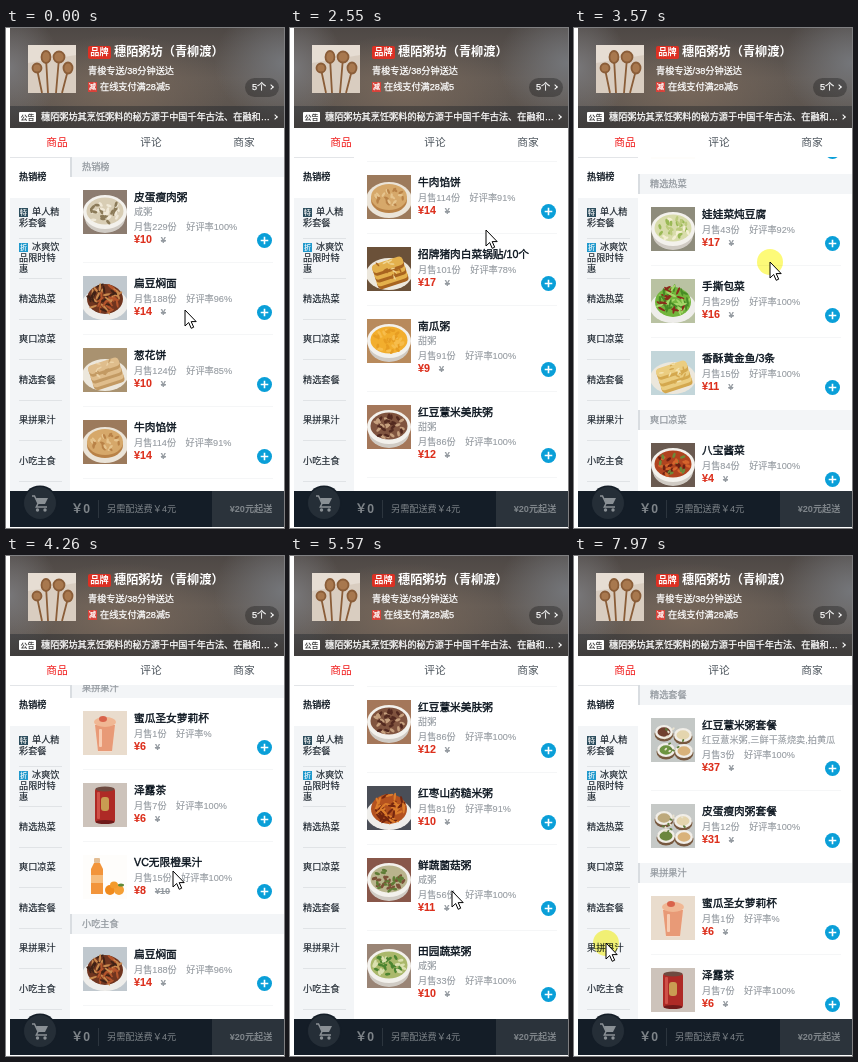
Write an HTML page that moves like this. It is 278 px wide and 500 px high and loops after 8000 ms.

```html
<!DOCTYPE html>
<html lang="zh-CN">
<head>
<meta charset="utf-8">
<title>外卖点餐</title>
<style>
html, body { margin: 0; width: 100%; height: 100%; overflow: hidden; background: #fff; }
#stage { position: relative; width: 278px; height: 500px; overflow: hidden;
  font: 9.17px/12px "Liberation Sans", "Noto Sans CJK SC", "Noto Sans CJK", sans-serif; white-space: nowrap; }
#stage * { box-sizing: border-box; }
.abs, .abs > * { position: absolute; }
b { font-weight: 700; }

.top { left: 4px; top: 0; width: 274px; height: 100px; color: #fff; overflow: hidden; -webkit-text-stroke: .25px;
  background: radial-gradient(ellipse 70px 60px at 100% 35%, #74767a, transparent), radial-gradient(ellipse 50px 60px at 0 40%, #777678, transparent),
    radial-gradient(ellipse 110px 55px at 40% 62%, #77675a, transparent), linear-gradient(#4e4845, #625a54 50%, #5a524c); }
.top .avatar { left: 18px; top: 17px; }
.brand { left: 78px; top: 18px; width: 23px; height: 13px; border-radius: 2px; background: #dc3023; text-align: center; line-height: 13px; -webkit-text-stroke: 0; }
.shop { left: 104px; top: 17px; font-size: 12.2px; line-height: 15px; -webkit-text-stroke: 0; }
.cut { left: 78px; top: 54px; width: 9px; height: 10px; background: #d8423a; font-size: 7px; line-height: 10px; text-align: center; }
.count { left: 235px; top: 50px; width: 34px; height: 19px; border-radius: 10px; background: rgba(0,0,0,.28); line-height: 19px; padding-left: 7px; }
.notice { left: 0; top: 78px; width: 274px; height: 22px; background: rgba(7,17,27,.32); }
.notice i { left: 9px; top: 6px; width: 17px; height: 10px; border-radius: 1px; background: #fff; color: #444; font: 700 7px/10px "Noto Sans CJK SC", sans-serif; text-align: center; -webkit-text-stroke: 0; }
.notice span { left: 31px; top: 5px; width: 230px; overflow: hidden; text-overflow: ellipsis; }
.top .chev { width: 4px; height: 4px; border: solid #fff; border-width: 1px 1px 0 0; border-radius: 0; background: none; transform: rotate(45deg); }

.tabs { left: 4px; top: 100px; width: 274px; height: 30px; border-bottom: 1px solid #e3e5e8; background: #fff; font-size: 10.7px; color: #4d555d; }
.tabs span { top: 7px; width: 60px; line-height: 15px; text-align: center; }

.menu { position: absolute; left: 4px; top: 129.5px; width: 60px; height: 334px; overflow: hidden; background: #f3f5f7; color: #1c252e; -webkit-text-stroke: .15px; }
.menu div { height: 40.5px; padding: 0 8px 0 9px; display: flex; align-items: center; position: relative; }
.menu div:first-child { background: #fff; font-weight: 700; }
.menu div + div:not(:last-child)::after { content: ""; position: absolute; left: 9px; right: 8px; bottom: 0; height: 1px; background: #e0e3e6; }
.menu p { margin: 0; width: 44px; line-height: 11px; white-space: normal; word-break: break-all; }
.menu i { display: inline-block; width: 9px; height: 9px; margin-right: 4px; color: #fff; font: 7px/9px "Noto Sans CJK SC", sans-serif; text-align: center; }

.view { position: absolute; left: 64px; top: 129px; width: 214px; height: 334px; overflow: hidden; background: #fff; }
.view h2 { margin: 0; height: 20px; padding-left: 10px; border-left: 2px solid #d9dde1; background: #f3f5f7; font: inherit; line-height: 20px; color: #93999f; -webkit-text-stroke: .25px; }
.item { position: relative; height: 72px; color: #93999f; -webkit-text-stroke: .1px; }
.item:not(.last)::after { content: ""; position: absolute; left: 13px; right: 11px; bottom: 0; height: 1px; background: #f5f6f7; }
.item > * { position: absolute; left: 64px; }
.item .pic { left: 13px; top: 13px; }
.item .name { top: 12px; font-size: 10.7px; line-height: 16px; color: #07111b; -webkit-text-stroke: .35px; }
.item .desc { top: 29px; width: 137px; white-space: normal; line-height: 13px; }
.item .info { bottom: 30px; }
.info span { margin-left: 9.5px; }
.item .price { bottom: 16px; font-size: 10.7px; line-height: 14px; font-weight: 700; color: #dc2f1c; }
.price s { margin-left: 9px; font-size: 9.17px; color: #93999f; }
.item .add { left: 186.5px; bottom: 15px; }

.bar { left: 4px; top: 463px; width: 274px; height: 36px; background: #141d27; color: #7e8489; }
.bar .pay { left: 202px; top: 0; width: 72px; height: 36px; padding-left: 6px; background: #2b333b; font-weight: 700; line-height: 37px; text-align: center; }
.bar .cart { left: 12px; top: -6px; }
#spot { left: -13px; top: -13px; width: 26px; height: 26px; border-radius: 50%; background: #fdfa78; mix-blend-mode: multiply; }
</style>
</head>
<body>
<div id="stage">
  <div class="top abs">
    <svg class="avatar" width="48" height="48">
      <rect width="48" height="48" fill="#d9cdc0"/><path d="M0 0H48V10L0 18Z" fill="#e6ddd3"/>
      <g fill="#a8784e" stroke="#8a5d38" stroke-width="1.8">
        <path d="M9 24L14 48M18 13L20 48M31 13L28 48M40 25L34 48"/>
        <circle cx="9" cy="23" r="4.5"/><ellipse cx="18" cy="12" rx="4.5" ry="6"/><circle cx="31" cy="12" r="5.5"/><ellipse cx="40" cy="23" rx="4.5" ry="5.5"/>
      </g>
    </svg>
    <b class="brand">品牌</b><b class="shop">穗陌粥坊（青柳渡）</b>
    <span style="left:78px;top:37px">青梭专送/38分钟送达</span>
    <span class="cut">减</span><span style="left:90px;top:53px">在线支付满28减5</span>
    <span class="count">5个</span><i class="chev" style="left:259px;top:57px"></i>
    <div class="notice abs"><i>公告</i><span>穗陌粥坊其烹饪粥料的秘方源于中国千年古法、在融和现代制作工艺</span><i class="chev" style="left:263px;top:9px"></i></div>
  </div>
  <div class="tabs abs"><span style="left:17px;color:#f01414">商品</span><span style="left:111px">评论</span><span style="left:204px">商家</span></div>
  <div class="menu" id="menu"></div>
  <div class="view"><div id="list"></div></div>
  <div class="bar abs">
    <svg class="cart" width="36" height="36">
      <circle cx="18" cy="18" r="17.5" fill="#141d27"/><circle cx="18" cy="18" r="16" fill="#252e37"/>
      <g fill="#8a9095"><path d="M14 13H26L23 19H16Z"/><circle cx="15.5" cy="25" r="1.7"/><circle cx="23" cy="25" r="1.7"/></g>
      <path d="M10 11H12.5L16 18.5L14.3 22H25" fill="none" stroke="#8a9095" stroke-width="1.5"/>
    </svg>
    <b style="left:61px;top:10px;font-size:12.2px;line-height:16px">￥0</b>
    <i style="left:88px;top:9px;width:1px;height:18px;background:#2c353e"></i>
    <span style="left:97px;top:12px">另需配送费￥4元</span>
    <span class="pay">¥20元起送</span>
  </div>
  <div class="abs" id="cursor" style="left:0;top:0">
    <div id="spot"></div>
    <svg width="14" height="21" style="left:-.5px;top:-.5px"><path d="M1 1V17L4.7 13.5L7.2 19.3L9.7 18.2L7.2 12.6H12.2Z" fill="#fff" stroke="#000"/></svg>
  </div>
</div>
<script>
// name: [description, sold, rating, price, old price, picture kind, backdrop, food, accents...]
const dishes = {
  皮蛋瘦肉粥: ['咸粥', 229, 100, 10, '', 'bowl', '#8c7c70', '#d8cdb4', '#8b7a58', '#f0e9d8'],
  扁豆焖面: ['', 188, 96, 14, '', 'plate', '#c0c8ce', '#70351f', '#b4552c', '#402216', '#c98a4e'],
  葱花饼: ['', 124, 85, 10, '', 'cake', '#a99270', '#dfbd8c', '#c39a63', '#ecd3a8'],
  牛肉馅饼: ['', 114, 91, 14, '', 'pie', '#9c7a5c', '#d6a86a', '#b98247', '#e6c48e'],
  '招牌猪肉白菜锅贴/10个': ['', 101, 78, 17, '', 'cake', '#6b5139', '#e3b04c', '#a8641f', '#f0d694'],
  南瓜粥: ['甜粥', 91, 100, 9, '', 'bowl', '#b88a5c', '#f2ae2e', '#f7bd4c', '#e79d22'],
  红豆薏米美肤粥: ['甜粥', 86, 100, 12, '', 'bowl', '#a4775a', '#80543f', '#532a20', '#c6a07e'],
  红枣山药糙米粥: ['', 81, 91, 10, '', 'plate', '#4a4e57', '#b4521f', '#dc7d2c', '#74260f'],
  糊塌子: ['', 80, 93, 10, '', 'pie', '#cbbf9f', '#d8b656', '#8da044', '#ecd58b'],
  鲜蔬菌菇粥: ['咸粥', 56, 100, 11, '', 'bowl', '#88574a', '#b9b48d', '#5f7d36', '#7c5138'],
  田园蔬菜粥: ['咸粥', 33, 100, 10, '', 'bowl', '#9a8576', '#aab86b', '#4c8531', '#dbe0b0'],
  红枣山药粥套餐: ['红枣山药糙米粥,素材包,爽口莴笋丝,四川泡菜或八宝酱菜', 17, 100, 29, '', 'set', '#c9cbc9', '#9b3c24', '#cfae72'],
  VC无限橙果汁: ['', 15, 100, 8, 10, 'bottle', '#fefdfb', '#f2943a'],
  娃娃菜炖豆腐: ['', 43, 92, 17, '', 'bowl', '#8e8c7c', '#d8dcaa', '#9ab956', '#f3efd2', '#bccb7c'],
  手撕包菜: ['', 29, 100, 16, '', 'plate', '#b9c2a2', '#72b53c', '#a5d768', '#468a25', '#8a2c1c'],
  '香酥黄金鱼/3条': ['', 15, 100, 11, '', 'cake', '#c3d6da', '#ebcd80', '#d4a84e', '#f4e3ae'],
  八宝酱菜: ['', 84, 100, 4, '', 'bowl', '#6a5a50', '#b0431f', '#d5652c', '#6b1f12', '#6c8a3a'],
  拍黄瓜: ['', 28, 100, 9, '', 'plate', '#37413a', '#4c7d3c', '#86b25a', '#254c25'],
  红豆薏米粥套餐: ['红豆薏米粥,三鲜干蒸烧卖,拍黄瓜', 3, 100, 37, '', 'set', '#c4c8c6', '#70402f', '#6d9440'],
  皮蛋瘦肉粥套餐: ['', 12, 100, 31, '', 'set', '#c6c9c7', '#bda97c', '#6c873e'],
  蜜瓜圣女萝莉杯: ['', 1, '', 6, '', 'glass', '#e9dccd', '#e58a62'],
  泽露茶: ['', 7, 100, 6, '', 'can', '#cdc3bb', '#ae2a26'],
};
const staples = '扁豆焖面 葱花饼 牛肉馅饼 招牌猪肉白菜锅贴/10个';
const sections = {
  热销榜: `皮蛋瘦肉粥 ${staples} 南瓜粥 红豆薏米美肤粥 八宝酱菜 红枣山药糙米粥 糊塌子`,
  单人精彩套餐: '红枣山药粥套餐',
  冰爽饮品限时特惠: 'VC无限橙果汁',
  精选热菜: '娃娃菜炖豆腐 手撕包菜 香酥黄金鱼/3条',
  爽口凉菜: '八宝酱菜 拍黄瓜',
  精选套餐: '红豆薏米粥套餐 皮蛋瘦肉粥套餐',
  果拼果汁: '蜜瓜圣女萝莉杯 泽露茶 VC无限橙果汁',
  小吃主食: `${staples} 糊塌子`,
  特色粥品: '皮蛋瘦肉粥 南瓜粥 红豆薏米美肤粥 红枣山药糙米粥 鲜蔬菌菇粥 田园蔬菜粥',
};
const badges = { 单人精彩套餐: ['特', '#2d4e5e'], 冰爽饮品限时特惠: ['折', '#2199cc'] };

const oval = (x, y, rx, ry, fill) => `<ellipse cx="${x}" cy="${y}" rx="${rx}" ry="${ry}" fill="${fill}"/>`;
const box = (x, y, w, h, fill, r = 0) => `<rect x="${x}" y="${y}" width="${w}" height="${h}" rx="${r}" fill="${fill}"/>`;

function random(seed) {
  return () => (seed = (seed * 16807) % 2147483647) / 2147483647;
}

function scatter(seed, colors, count, rx, ry, w, h) {
  const rnd = random(seed);
  let out = '';
  for (let i = 0; i < count; i++) {
    const a = rnd() * 6.283, d = Math.sqrt(rnd());
    const x = 22 + Math.cos(a) * d * rx, y = 22 + Math.sin(a) * d * ry;
    out += `<g transform="translate(${x.toFixed(1)} ${y.toFixed(1)}) rotate(${Math.round(rnd() * 180)})">${oval(0, 0, w, h, colors[i % colors.length])}</g>`;
  }
  return out;
}

const kinds = {
  bowl: (seed, food, accents) => oval(22, 28, 20, 15, '#d0cbc4') + oval(22, 22, 22, 17, '#f3f1ec')
    + oval(22, 21, 18.5, 13.5, food) + scatter(seed, accents, 34, 16, 11, 2.8, 1.4),
  plate: (seed, food, accents) => oval(22, 28, 23, 16, '#eeedea') + oval(22, 23, 18, 15, food)
    + scatter(seed, accents, 50, 16, 14, 4, 1.1),
  pie: (seed, food, accents) => oval(22, 25, 23, 18, '#ebe4d8') + oval(22, 25, 18, 13, accents[0])
    + oval(22, 22, 18, 13, food) + scatter(seed, accents, 24, 14, 9, 2.6, 1.2),
  cake: (seed, food, accents) => oval(22, 27, 23, 16, '#ece7dc')
    + [0, 1, 2].map(i => `<g transform="rotate(-18 22 22)">${box(6, 29 - i * 7, 32, 10, accents[0], 4) + box(6, 27 - i * 7, 32, 9, food, 4)}</g>`).join('')
    + scatter(seed, accents, 14, 13, 10, 2.6, .8),
  set: (seed, food, accents) => [[13, 14, food], [32, 17, '#e4d5ae'], [15, 32, accents[0]], [33, 33, '#d9b27a']]
    .map(([x, y, c]) => oval(x, y + 2, 9.5, 7.5, '#77583f') + oval(x, y, 9, 7, '#f1eee8') + oval(x, y, 6.5, 4.7, c)).join('')
    + scatter(seed, ['#5f7d3c', '#e9e2cf'], 12, 15, 13, 1.6, 1),
  glass: (seed, food) => `<path d="M11 9H33L29 41H15Z" fill="#f5dccb"/><path d="M12 14H32L29 40H15Z" fill="${food}" opacity=".8"/>`
    + oval(22, 11, 11, 5, '#f0b794') + oval(20, 8, 4, 3, '#d9634b') + box(16, 18, 3, 18, '#f7cdb3', 1),
  can: (seed, food) => box(12, 5, 20, 35, food, 3) + oval(22, 6, 9.5, 2.5, '#6e4a40') + box(14, 9, 3, 27, '#cf5148', 1)
    + box(18, 14, 8, 14, '#c99c52', 3) + oval(22, 39, 9.5, 2, '#6f1a1a'),
  bottle: (seed, food) => box(11, 3, 6, 5, '#e3bd94', 1) + `<path d="M11 8H17L20 14V39H8V14Z" fill="${food}"/>` + box(8, 20, 12, 8, '#f6bd7d')
    + oval(27, 35, 5, 5, '#f08a1c') + oval(36, 35, 5, 5, '#f59f34') + oval(31, 30, 4, 3.5, '#f39a2c') + oval(38, 30, 3, 1.5, '#5f8a3a'),
};

function picture(seed, kind, back, food, accents) {
  return `<svg class="pic" width="44" height="44">${box(0, 0, 44, 44, back)}${kinds[kind](seed, food, accents)}</svg>`;
}

const addButton = '<svg class="add" width="15" height="15"><circle cx="7.5" cy="7.5" r="7.5" fill="#0a9fd8"/><path d="M3.7 7.5H11.3M7.5 3.7V11.3" stroke="#fff" stroke-width="1.6"/></svg>';

function itemHtml(name, last) {
  const [desc, sold, rating, price, old, kind, back, food, ...accents] = dishes[name];
  const height = !desc ? 72 : desc.length > 20 ? 99 : 86;
  const seed = 77 + name.length * 131 + sold * 17;
  return `<div class="item${last ? ' last' : ''}" style="height:${height}px">${picture(seed, kind, back, food, accents)}
    <div class="name">${name}</div>${desc && `<div class="desc">${desc}</div>`}
    <div class="info">月售${sold}份<span>好评率${rating}%</span></div>
    <div class="price">¥${price}<s>¥${old}</s></div>${addButton}</div>`;
}

const $ = id => document.getElementById(id);
$('menu').innerHTML = Object.keys(sections).map(title => {
  const badge = badges[title];
  return `<div><p>${badge ? `<i style="background:${badge[1]}">${badge[0]}</i>` : ''}${title}</p></div>`;
}).join('');
$('list').innerHTML = Object.entries(sections).map(([title, names]) =>
  `<h2>${title}</h2>` + names.split(' ').map((name, i, all) => itemHtml(name, i === all.length - 1)).join('')).join('');

const linear = k => k, easeOut = k => k * (2 - k), smooth = k => k * k * (3 - 2 * k);

// Each point is [time, values..., easing into it]
const scrollTrack = [
  [1560, 0], [1850, 75, smooth], [2020, 75], [2300, 100], [2550, 244, smooth], [2950, 500, easeOut],
  [3150, 700], [3500, 970, easeOut], [3570, 975], [3720, 1060], [3950, 1270, easeOut], [4120, 1420],
  [4260, 1577], [4440, 1690, easeOut], [4600, 1800], [4820, 1990, easeOut], [4990, 2110], [5450, 2377, easeOut],
  [6180, 2377], [6500, 1229, easeOut], [7030, 1229], [7340, 1393, easeOut],
];
const cursorTrack = [
  [840, 261, 178], [1100, 145, 215], [1410, 196, 240], [1600, 196, 240], [1850, 196, 185], [2020, 196, 185],
  [2300, 196, 290], [2550, 196, 202], [2720, 196, 200], [2950, 196, 285], [3150, 196, 200], [3480, 196, 240],
  [3570, 196, 234], [3720, 185, 190], [3950, 172, 330], [4120, 168, 230], [4260, 167, 315], [4440, 165, 330],
  [4600, 165, 230], [4820, 163, 335], [4990, 163, 235], [5200, 162, 335], [5580, 162, 335], [6030, 43, 303],
  [6450, 43, 303], [6730, 43, 341], [6900, 42, 347], [7300, 42, 347], [7780, 32, 387],
];
const presses = [[1600, 1850], [2300, 2530], [2950, 3130], [3520, 3710], [3950, 4110], [4440, 4590], [4820, 4980], [6150, 6300], [6980, 7120], [7890, 8000]];

function sample(track, t, size, ease) {
  const i = track.findIndex(p => p[0] > t);
  if (i <= 0) return track[i < 0 ? track.length - 1 : 0].slice(1, size + 1);
  const a = track[i - 1], b = track[i];
  const k = (b[size + 1] || ease)((t - a[0]) / (b[0] - a[0]));
  return a.slice(1, size + 1).map((v, n) => v + (b[n + 1] - v) * k);
}

function draw(now) {
  const t = now % 8000;
  const [scroll] = sample(scrollTrack, t, 1, linear);
  const [x, y] = t < 70 ? [179, 282] : sample(cursorTrack, t, 2, smooth);
  $('list').style.transform = `translateY(${-Math.round(scroll)}px)`;
  $('cursor').style.left = Math.round(x) - .5 + 'px';
  $('cursor').style.top = Math.round(y) - .5 + 'px';
  $('cursor').style.visibility = t >= 70 && t < 840 ? 'hidden' : 'visible';
  $('spot').style.display = presses.some(([from, to]) => t >= from && t < to) ? 'block' : 'none';
}

const start = performance.now();
function tick() {
  draw(performance.now() - start);
  requestAnimationFrame(tick);
}
tick();
</script>
</body>
</html>
```
